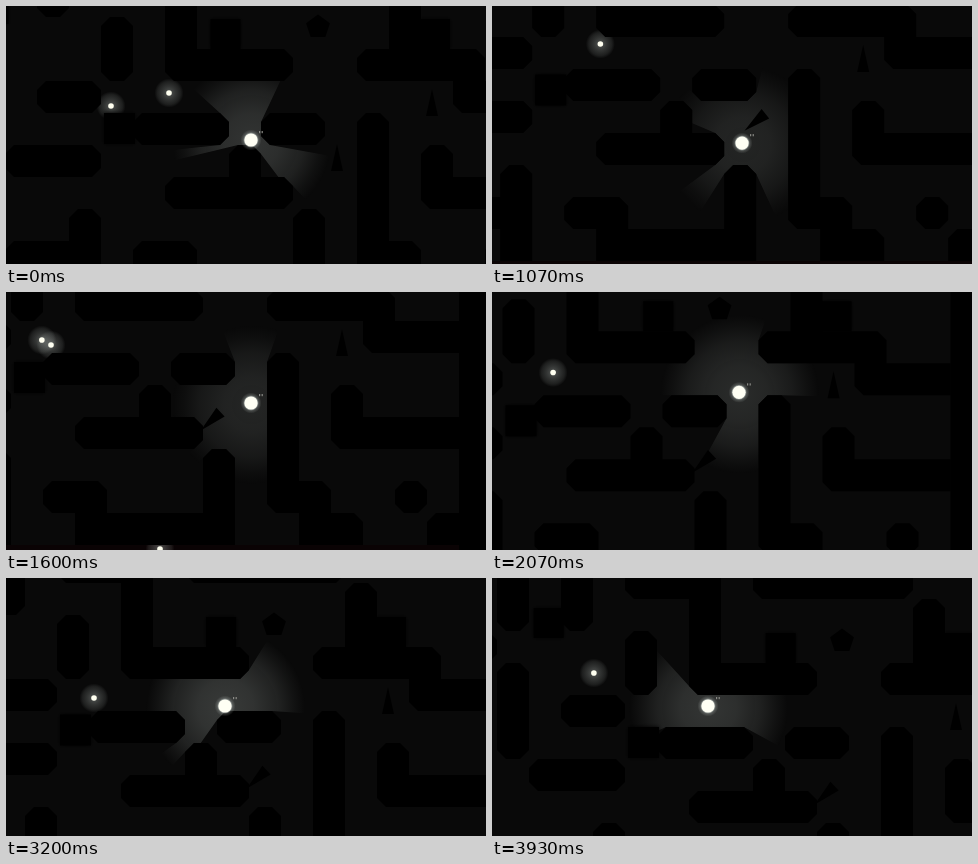
Animation of 480 by 258 pixels, one loop 3990 ms. Source, as an HTML page with a canvas:

```html
<!DOCTYPE html>
<html lang="en">
<head>
<meta charset="utf-8">
<title>Light in the maze</title>
<style>
  html, body { margin: 0; width: 100%; height: 100%; overflow: hidden; background: #090909; }
  canvas { display: block; }
</style>
</head>
<body>
<canvas id="stage" width="480" height="258"></canvas>
<script>
const W = 480, H = 258, LOOP = 3990, STEP = 200 / 3, LAST = 59;
const TILE = 32, CUT = 9, REACH = 80, TAU = Math.PI * 2;
const FLOOR = '#090909', PIT = '#0a0304';

// The level, one character per tile.
const MAP = [
  '.#.#.###.#####.....',
  '.#.#...#......#....',
  '#....#.#......#....',
  '.#...#.####..####..',
  '.#.##...........###',
  '.#....###.##.#.....',
  '..###....#...#.#...',
  '.......####..#.####',
  '....#......#.#.....',
  '..###.##...#.##..#.',
  '....#..#####..##..#'
];
const LEFT = -65, TOP = -53, RIGHT = LEFT + 19 * TILE, BOTTOM = TOP + 11 * TILE;

// Key points: time, camera shift, player on the stage.
const journey = [
  [0, 0, 0, 245, 134],
  [530, -27, -31, 257, 136],
  [1070, -55, -44, 250, 137],
  [1600, -90, -46, 245, 111],
  [2050, -85, -5, 247, 100],
  [2600, -59, 25.5, 245, 127],
  [3200, -44, 26, 219, 128],
  [3930, 38, 42, 216, 128]
];
// Time, place in the level, turn in degrees.
const shard = [[0, 331, 152, 0], [530, 331, 149, 184], [1070, 318, 160, 231], [1600, 295, 175, 227]];

// Wisps: time, place on the stage.
const wisps = [
  [[0, 163, 87], [530, 161, 64], [1070, 108, 38], [1600, 45, 53], [2600, 91, 111], [3200, 88, 120], [LOOP, 103, 93]],
  [[0, 105, 100], [530, 28, 100], [1070, -30, 70], [1700, 50, 44]],
  [[1400, 150, 275], [1800, 158, 239]]
];

const ctx = document.getElementById('stage').getContext('2d');
const glow = document.createElement('canvas');
glow.width = W;
glow.height = H;
const gtx = glow.getContext('2d');

// Smooth curve through the keys, with tangents from the neighbours.
function at(keys, t) {
  const n = keys.length - 1;
  if (t <= keys[0][0]) return keys[0].slice(1);
  if (t >= keys[n][0]) return keys[n].slice(1);
  let i = 0;
  while (keys[i + 1][0] < t) i++;
  const a = keys[i], b = keys[i + 1], d = b[0] - a[0], u = (t - a[0]) / d;
  const slope = (j, k) => {
    const p = keys[Math.max(j - 1, 0)], q = keys[Math.min(j + 1, n)];
    return (q[k] - p[k]) / (q[0] - p[0]) * d;
  };
  return a.slice(1).map((v, j) => {
    const k = j + 1, w = b[k], m = slope(i, k), s = slope(i + 1, k);
    return v + u * (m + u * (3 * (w - v) - 2 * m - s + u * (2 * (v - w) + m + s)));
  });
}

const swing = (t, mid, size, period) => mid - size * Math.cos(TAU * t / period);
const solid = (c, r) => (MAP[r] || '')[c] === '#';

// Clockwise outline of a tile; free corners are cut off.
function cell(c, r) {
  const x = LEFT + c * TILE, y = TOP + r * TILE;
  const pts = [];
  [[-1, -1], [1, -1], [1, 1], [-1, 1]].forEach(([sx, sy]) => {
    const px = x + (sx > 0 ? TILE : 0), py = y + (sy > 0 ? TILE : 0);
    const edge = c + sx >= MAP[0].length || r + sy >= MAP.length;
    if (edge || solid(c + sx, r) || solid(c, r + sy)) return pts.push([px, py]);
    const h = [px - sx * CUT, py], v = [px, py - sy * CUT];
    pts.push(...(sx === sy ? [v, h] : [h, v]));
  });
  return pts;
}

const walls = [];
MAP.forEach((row, r) => [...row].forEach((ch, c) => ch === '#' && walls.push(cell(c, r))));

const box = (x, y, size = 30) => [[x, y], [x + size, y], [x + size, y + size], [x, y + size]];

function spike(x, y, deg) {
  const a = deg * TAU / 360, s = Math.sin(a), c = Math.cos(a);
  return [[0, -14], [6, 13], [-6, 13]].map(([u, v]) => [x + u * c - v * s, y + u * s + v * c]);
}

const pentagon = Array.from({ length: 5 }, (_, i) =>
  [312 + 12.5 * Math.sin(i * TAU / 5), 21 - 12.5 * Math.cos(i * TAU / 5)]);

function fillAll(c, shapes) {
  c.beginPath();
  shapes.forEach(pts => {
    pts.forEach(([x, y], i) => i ? c.lineTo(x, y) : c.moveTo(x, y));
    c.closePath();
  });
  c.fill();
}

function disc(c, x, y, r, fill) {
  c.fillStyle = fill;
  c.beginPath();
  c.arc(x, y, r, 0, TAU);
  c.fill();
}

function radial(c, x, y, r, stops) {
  const g = c.createRadialGradient(x, y, 0, x, y, r);
  stops.forEach(([o, a]) => g.addColorStop(o, `rgba(236,246,240,${a})`));
  disc(c, x, y, r, g);
}

// Light around a lamp, minus the shadow behind every edge that faces it.
function castLight(lx, ly, cx, cy, level, shapes) {
  gtx.setTransform(1, 0, 0, 1, 0, 0);
  gtx.clearRect(0, 0, W, H);
  gtx.translate(cx, cy);
  radial(gtx, lx, ly, REACH, [[0, level], [0.35, level * 0.85], [0.65, level * 0.52], [0.85, level * 0.2], [1, 0]]);
  const far = ([x, y]) => [lx + (x - lx) * 60, ly + (y - ly) * 60];
  const quads = [];
  shapes.forEach(s => s.forEach((a, i) => {
    const b = s[(i + 1) % s.length];
    const side = (b[0] - a[0]) * (ly - a[1]) - (b[1] - a[1]) * (lx - a[0]);
    if (side < 0 && Math.hypot(a[0] - lx, a[1] - ly) < REACH + TILE) quads.push([a, b, far(b), far(a)]);
  }));
  gtx.globalCompositeOperation = 'destination-out';
  gtx.fillStyle = '#000';
  fillAll(gtx, quads);
  gtx.globalCompositeOperation = 'source-over';
}

function drawWisp(path, t) {
  if (t < path[0][0] || t > path[path.length - 1][0]) return;
  const [x, y] = at(path, t);
  radial(ctx, x, y, 14.5, [[0, 0.32], [0.45, 0.18], [0.8, 0.09], [1, 0]]);
  disc(ctx, x, y, 2.8, '#fffff0');
}

function drawPlayer(x, y) {
  radial(ctx, x, y, 10.5, [[0, 0.6], [0.64, 0.5], [0.74, 0.18], [1, 0]]);
  disc(ctx, x, y, 6.6, '#fffff4');
  ctx.fillStyle = '#8a8a86';
  ctx.fillRect(x + 8, y - 9, 1.2, 2.2);
  ctx.fillRect(x + 10.6, y - 9, 1.2, 2.2);
}

function draw(t) {
  const [cx, cy, px, py] = at(journey, t);
  const slide = swing(t, 224.5, 20, 6000);
  const blocks = [box(slide, 13), box(slide - 232, -12), box(414, 13), box(98, swing(t, 112, 5, LOOP), 31)];
  const loose = [pentagon, spike(426, 97, 0), spike(...at(shard, t))];
  const level = swing(t - 1300, 0.165, 0.045, LOOP);

  ctx.setTransform(1, 0, 0, 1, 0, 0);
  ctx.fillStyle = FLOOR;
  ctx.fillRect(0, 0, W, H);
  ctx.fillStyle = PIT;
  ctx.fillRect(0, BOTTOM + cy, W, H);
  ctx.fillStyle = '#000';
  ctx.fillRect(RIGHT + cx, 0, W, H);

  // The lamp hangs slightly below the middle of the player.
  castLight(px - cx + 0.7, py - cy + 1.7, cx, cy, level, [...walls, ...blocks]);
  ctx.drawImage(glow, 0, 0);
  wisps.forEach(path => drawWisp(path, t));

  ctx.translate(cx, cy);
  ctx.fillStyle = '#000';
  fillAll(ctx, [...walls, ...loose]);
  ctx.shadowColor = '#000';
  ctx.shadowBlur = 4;
  fillAll(ctx, blocks);
  ctx.shadowBlur = 0;
  ctx.translate(-cx, -cy);

  drawPlayer(px, py);
}

const start = performance.now();
function tick() {
  const t = (performance.now() - start) % LOOP;
  draw(Math.min(LAST, Math.floor((t + 5) / STEP)) * STEP);
  requestAnimationFrame(tick);
}
tick();
</script>
</body>
</html>
```
